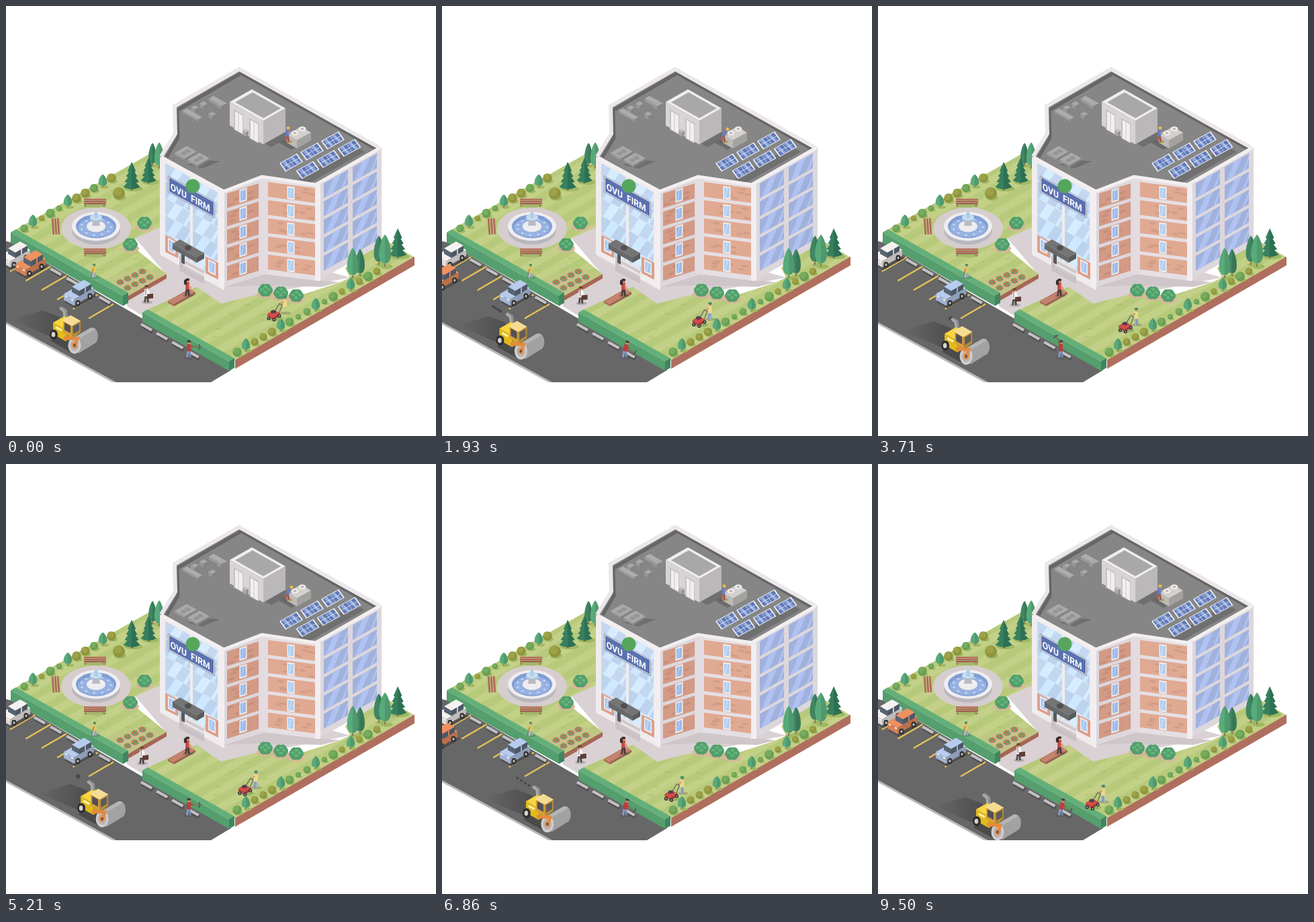
An HTML page that plays this animation: 640x640 px, repeating every 9.57 s.

```html
<!DOCTYPE html>
<html lang="en">
<head>
<meta charset="utf-8">
<title>Isometric office block</title>
<style>
  html, body { margin: 0; width: 100%; height: 100%; overflow: hidden; background: #fff; }
  svg { display: block; width: 100%; height: 100%; }
  text { font: bold 14px Roboto, "Liberation Sans", sans-serif; fill: #fff; }
</style>
</head>
<body>
<svg id="stage" viewBox="0 0 640 640"></svg>
<script>
const LOOP = 9570, STEPS = 134, ISO = .565;
const out = [];
let seed = 11;
const rnd = () => (seed = seed * 16807 % 2147483647) / 2147483647;
const times = (n, f) => { for (let i = 0; i < n; i++) f(i); };

// Basic shapes
const add = s => out.push(s);
const poly = (fill, pts) => add(`<polygon fill="${fill}" points="${pts}"/>`);
const line = (color, w, pts) => add(`<polyline fill="none" stroke="${color}" stroke-width="${w}" points="${pts}"/>`);
const oval = (fill, x, y, rx, ry = rx) => add(`<ellipse fill="${fill}" cx="${x}" cy="${y}" rx="${rx}" ry="${ry}"/>`);
const path = (fill, d) => add(`<path fill="${fill}" d="${d}"/>`);
const group = (attrs, draw) => { add(`<g ${attrs}>`); draw(); add('</g>'); };
const at = (x, y, draw, k = 1) => group(`transform="translate(${x} ${y}) scale(${k})"`, draw);
const tone = (hex, k) => `rgb(${[1, 3, 5].map(i => Math.min(255, parseInt(hex.substr(i, 2), 16) * k | 0))})`;

// Wall pieces: upright sides, top and bottom edges at slope m
const spot = (x, y, w, h, m) => (u, v) => `${x + u * w},${y + m * u * w + v * h} `;
const quad = (fill, x, y, w, h, m) => {
  const p = spot(x, y, w, h, m);
  poly(fill, p(0, 0) + p(1, 0) + p(1, 1) + p(0, 1));
};
const glass = (x, y, w, h, m, base) => {
  const p = spot(x, y, w, h, m), lite = tone(base, 1.1);
  quad(base, x, y, w, h, m);
  poly(lite, p(.08, 1) + p(.38, 1) + p(.72, 0) + p(.4, 0));
  poly(lite, p(.72, 1) + p(.84, 1) + p(1, .45) + p(1, .1));
};
const windowAt = (x, y, m, pane) => {
  quad('#f3eff1', x, y, 11, 19, m);
  glass(x + 1.5, y + 2 + m * 1.5, 8, 15, m, pane);
};

// Flat rhomb and solid box; (x, y) is the near corner, a runs left, b runs right
const slab = (fill, x, y, a, b) => {
  const p = (u, v) => `${x + v - u},${y - (u + v) * ISO} `;
  poly(fill, p(0, 0) + p(a, 0) + p(a, b) + p(0, b));
};
const box = (x, y, a, b, h, color, side = color) => {
  slab(color, x, y, a, b);
  quad(tone(side, .9), x - a, y - a * ISO, a, h, ISO);
  quad(tone(side, .78), x, y, b, h, -ISO);
};

// Plants
const shrub = (x, y, r) => {
  const color = rnd() < .5 ? '#8f9440' : '#6b9e55';
  oval('#9fb862', x + 2, y + r * .7, r, r * .5);
  oval(color, x, y, r);
  oval(tone(color, 1.1), x - r * .2, y - r * .25, r * .68);
};
const leafTree = (x, base, w, h, color = '#59aa7b') => {
  const r = w / 2, top = base - h, foot = base - h * .1;
  oval('#9fb862', x + 3, base, r, r * .4);
  line('#8a6a50', 1.6, `${x},${foot} ${x},${base}`);
  const half = s => `M${x},${top} C${x + s * r * .9},${top + h * .15} ${x + s * r * 1.8},${foot} ${x},${foot}Z`;
  path(color, half(-1));
  path(tone(color, .9), half(1));
};
const treePair = (x, base, h, gap) => {
  leafTree(x + gap, base - 3, h * .3, h * .9, '#408661');
  leafTree(x, base, h * .36, h);
};
const pine = (x, base, w, h) => {
  const top = base - h;
  oval('#9fb862', x + 3, base - 2, w * .55, 4);
  line('#80604a', 3, `${x},${base - 6} ${x},${base}`);
  for (let i = 3; i >= 0; i--) {
    const y = top + i * h * .19, r = w * (.24 + i * .088), b = y + h * .32;
    path('#37805f', `M${x},${y} L${x + r},${b} Q${x},${b + 6} ${x - r},${b}Z`);
    path('#2d7054', `M${x},${y} L${x + r},${b} Q${x + r / 2},${b + 3} ${x},${b + 3}Z`);
  }
};
const border = (x0, y0, n) => times(n, i => {
  const x = x0 + 13 * i, y = y0 - 7.5 * i;
  if (i % 4 == 1) leafTree(x, y + 6, 12, 19);
  else shrub(x, y, 4 + 3 * rnd());
});
const bush = (x, y) => {
  oval('#d9b69b', x, y + 6, 13, 6);
  times(6, i => oval('#519f6b', x + 5 * Math.cos(i * 1.05), y + 4 * Math.sin(i * 1.05), 6));
  times(4, i => oval('#66b37d', x + 5 * Math.cos(i * 1.6), y - 1 + 4 * Math.sin(i * 1.6), 2.8, 2));
};
const hedge = (x, y, w, h) => {
  box(x + w, y + w * ISO, w, 8, h, '#64af79', '#5fb07a');
  quad('#3f8560', x + w, y + w * ISO, 8, h, -ISO);
};
const tufts = (x, y, a, b) => times(7, () => {
  const u = rnd() * a, v = rnd() * b, tx = x + v - u, ty = y - (u + v) * ISO;
  times(3, i => line('#9cb763', .8, `${tx + i * 3},${ty} ${tx + i * 3 + 1},${ty + 3}`));
});

// Furniture, cars and people
const bench = (x, y) => at(x, y, () => {
  oval('#a5b86c', 1, 6, 17, 3);
  times(3, i => line(tone('#b66f60', 1 - i * .06), 2.6, `-16,${i * 3 - 3} 17,${i * 3 - 3}`));
  for (const s of [-14, 14]) line('#7d4a44', 1.2, `${s},5 ${s},8`);
});
const car = color => {
  slab('#505050', -6, 23, 16, 32);
  box(-8, 10, 15, 30, 9, color);
  box(0, -3, 11, 18, 8, color, '#62707f');
  line(color, 1.5, '9,-8 9,0');
  for (const x of [-2, 16]) {
    const y = 14 - x * ISO;
    oval('#2e2e2e', x, y, 3.6, 4.4);
    oval('#b5b5b5', x, y, 1.6, 2.1);
  }
  for (const x of [-21, -12]) line('#f7f0d8', 2.2, `${x},${16 + x * ISO} ${x + 3},${17.7 + x * ISO}`);
};
const person = (id, hat, shirt, legs, extra, k = 1) => group(`id="${id}"`, () => group(`transform="scale(${k})"`, () => {
  oval('rgba(60,60,50,.25)', 1, 0, 8, 2.3);
  group(`id="${id}Legs"`, () => {
    for (const s of [-1, 1]) add(`<path stroke="${tone(legs, 1 - s * .07)}" stroke-width="2.8" vector-effect="non-scaling-stroke" d="M${s},-10 L${s * 2.5},0"/>`);
  });
  group(`id="${id}Top"`, () => {
    line(shirt, 5.8, '0,-20 0,-9');
    oval('#d59a78', .4, -22, 2.4);
    oval(hat, .2, -23.8, 2.9, 1.9);
    extra();
  });
}));

function ground() {
  add(`<defs>
    <pattern id="lawn" width="40" height="26" patternUnits="userSpaceOnUse" patternTransform="skewY(-30)">
      <rect width="40" height="26" fill="#c3d087"/><rect width="40" height="13" fill="#b7ca7b"/></pattern>
    <linearGradient id="trail"><stop offset="0" stop-color="#3c3c3c" stop-opacity="0"/>
      <stop offset="1" stop-color="#3c3c3c" stop-opacity=".6"/></linearGradient>
    <clipPath id="frame"><rect width="640" height="560"/></clipPath></defs>`);
  poly('#676767', '0,350 8,352 335,542 305,560 160,560 0,473');
  line('#fff', 7, '-2,476 160,565');
  line('#b9b9b9', 3, '-2,471 163,561');
  poly('#d9d1d3', '180,447 180,430 238,399 192,345 225,325 512,404 372,431 318,444 214,452 203,461');
  poly('url(#lawn)', '7,337 230,211 250,320 192,346 196,364 239,399 181,432');
  poly('url(#lawn)', '206,454 284,418 320,443 372,430 440,430 498,411 512,404 505,390 557,344 608,374 341,528');
  poly('#cfc6ca', '326,418 382,399 462,408 497,411 470,418 374,416');
  quad('#b06f5e', 341, 527, 267, 13, -.577);
  quad('#a76656', 181, 432, 58, 7, -.577);
  tufts(170, 412, 110, 60);
  tufts(335, 515, 90, 90);
}

function garden() {
  treePair(228, 241, 38, -10);
  pine(212, 264, 23, 38);
  pine(187, 274, 25, 42);
  border(27, 331, 11);
  shrub(168, 279, 9);

  // Fountain
  oval('#d6cdcf', 134, 331, 52, 31);
  oval('#b9b7bd', 134, 334, 36, 21);
  oval('#efedf0', 134, 328, 36, 21.5);
  oval('#7f9dd4', 134, 328, 30, 17.5);
  oval('#97b2e1', 134, 330, 27, 14);
  times(11, i => oval('#cbdcf5', 134 + 22 * Math.cos(i * .57), 329 + 12 * Math.sin(i * .57), 2, 1.1));
  oval('#efedf0', 134, 328, 14, 8.5);
  poly('#bdbac1', '130,314 138,314 140,327 128,327');
  oval('#a9bccf', 134, 317, 9, 5);
  oval('#c7dcee', 134, 314.5, 9, 5);
  oval('#a9cde8', 134, 311, 2.7, 5);

  bench(132, 291);
  bench(132, 365);
  group('transform="translate(74 328) rotate(86) scale(.8 1)"', () =>
    times(3, i => line('#b06a5c', 2.8, `-15,${i * 4 - 4} 15,${i * 4 - 4}`)));
  bush(206, 323);
  bush(185, 355);

  // Flower bed
  poly('#bfc783', '150,406 198,389 239,399 181,431');
  times(8, n => {
    const i = n % 4, r = n >> 2, x = 170 + i * 11 + r * 11, y = 411 - i * 5.3 + r * 8.5;
    oval('#d9b49b', x, y + 2, 7, 4);
    oval('#5b9f60', x, y, 5.5, 4);
    times(4, j => oval('#e27159', x + 3.6 * Math.cos(j * 1.57), y - .5 + 2.4 * Math.sin(j * 1.57), 1.7, 1.4));
  });
}

function roof() {
  poly('#868686', '347,94 556,211 461,266 381,254 324,277 231,224 252,190 251,149');
  group('transform="translate(3 6)"', () => line('#666', 5, '236,219 253,190 252,149 347,94 552,209'));
  line('#ece7ea', 6, '231,224 252,190 251,149 347,94 556,211');

  // Loose ducts
  box(286, 169, 23, 6, 3, '#adadad');
  box(322, 149, 20, 7, 4, '#adadad');
  times(4, i => box(281 + 13 * i, 155 + 9 * Math.sin(i * 2.3 + 3.2), 6, 6, 5, '#a8a8a8'));

  // Flat fan units
  poly('#6f6f6f', '270,236 292,229 319,231 292,242');
  for (const [x, y] of [[266, 227], [285, 237]]) {
    box(x, y, 15, 18, 3, '#a9a9a9');
    for (const d of [6, 12]) oval('#959595', x + d - 7.5, y - 4 - d * ISO, 4.2, 2.6);
  }

  // Stair house
  slab('#6f6f6f', 395, 210, 20, 30);
  box(383, 171, 50, 33, 35, '#f1ecee');
  slab('#a8a8a8', 383, 167, 42, 26);
  for (const x of [341, 364]) {
    quad('#c5c0c3', x - 2, x * ISO - 39, 14, 30, ISO);
    quad('#f3eff1', x, x * ISO - 36, 11, 27, ISO);
    line('#cbc6c9', 1, `${x + 5},${x * ISO - 33} ${x + 5},${x * ISO - 6}`);
  }
  box(357, 188, 5, 4, 6, '#c0bcbe');

  // Solar array
  slab('#707070', 449, 265, 14, 85);
  times(6, n => {
    const i = n % 3, j = n >> 2 || +(n == 3), cx = 424.5 + 31 * i + 24.5 * j, cy = 233 - 16.5 * i + 11.2 * j;
    at(cx, cy, () => {
      const p = (u, v, k = 1) => `${k * (13 * u + 4.5 * v)},${k * (-7.2 * u + 6.2 * v)} `;
      const sheet = (fill, k) => poly(fill, p(-1, -1, k) + p(1, -1, k) + p(1, 1, k) + p(-1, 1, k));
      sheet('#f2f2f4', 1);
      sheet('#6079b8', .88);
      for (const u of [-.8, .1]) poly('#8ea5d8', p(u, -.88) + p(u + .35, -.88) + p(u + .65, .88) + p(u + .3, .88));
      line('#dbe3f3', .9, p(-.88, 0) + p(.88, 0));
      for (const u of [-.44, 0, .44]) line('#dbe3f3', .9, p(u, -.88) + p(u, .88));
    });
  });

  // Air conditioner
  slab('#6b6b6b', 425, 214, 20, 16);
  box(433, 200, 15, 21, 12, '#d3d0cd');
  for (const x of [430, 441]) {
    const y = 432 - x * ISO;
    oval('#f0eeec', x, y, 5.5, 3.6);
    oval('#b9b6b4', x, y, 2.6, 1.6);
  }
  oval('#e3c04c', 423.5, 203, 2);
}

function building() {
  const rows = f => times(5, i => f(27 * i, i));
  const bricks = (fill, x, y, w, m) => {
    quad(fill, x, y, w, 22, m);
    times(w / 9 | 0, () => {
      const u = rnd() * (w - 9);
      quad(tone(fill, .93), x + u, y + u * m + 2 + rnd() * 15, 9, 3, m);
    });
  };

  // Glazed entrance front
  quad('#f0ecee', 229, 224, 96, 146, .555);
  for (const x of [237, 278]) rows((d, i) => glass(x, 234 + (x - 237) * .555 + d * .96, 37, 25, .555, i % 2 ? '#bcd3ee' : '#c3d8f0'));
  for (const x of [237, 297]) {
    quad('#dd9f88', x, 341 + (x - 237) * .53, 19, 25, .5);
    windowAt(x + 4, 345 + (x - 237) * .53, .5, '#a9c4e8');
  }
  quad('#c9c1c5', 258, 372, 37, 22, .53);
  times(4, i => quad(i % 2 ? '#cfc8cb' : '#e9e4e6', 264, 374 + i * 4, 31, 4, .53));
  quad('#585858', 261, 366, 5, 16, ISO);
  box(284, 374, 36, 11, 8, '#747474');
  oval('#505050', 271, 360, 5, 4);

  // Sign
  ['#8e93a8', '#f5f6fa', '#5a71b0'].forEach((color, d) => quad(color, 241 + d, 252 + d * 1.55, 70 - 2 * d, 25 - 2 * d, .556));
  add('<text transform="matrix(.866 .49 0 1 244.8 273.3)">OVU</text>');
  add('<text transform="matrix(.866 .49 0 1 275 290.3)">FIRM</text>');
  oval('#55a65c', 278, 268, 10.5);

  // Brick wings
  poly('#ddd7dc', '324,277 381,254 383,400 325,418');
  poly('#e5dfe3', '381,254 461,266 465,409 383,399');
  rows(d => {
    bricks('#d39a85', 329, 279 + d, 47, -.32);
    bricks('#e0a992', 390, 262 + d, 70, .13);
    windowAt(347.5, 274 + d, -.32, '#9ab7e4');
    windowAt(418.5, 268 + d, .13, '#adcbee');
  });
  quad('#e2dbe0', 377, 256, 13, 143, -.1);

  // Glazed side
  poly('#ddd7dc', '461,266 559,210 559,355 465,409');
  for (const x of [473, 516]) rows(d => glass(x, 264 - (x - 473) * ISO + d, 36, 22, -ISO, '#a0b1dc'));
  quad('#f2edf0', 460, 266, 8, 143, 0);
  quad('#f2edf0', 316, 274, 9, 144, .4);
  line('#f3eff1', 5, '231,225 324,276 381,254 461,266 557,211');
}

function frontage() {
  pine(583, 375, 26, 44);
  treePair(564, 388, 48, -9);
  treePair(516, 405, 45, 11);
  times(3, i => bush(386 + 23 * i, 423 + 4 * i));
  border(344, 515, 17);

  // Slatted seat
  box(250, 444, 9, 32, 3, '#bf7a67');
  for (const d of [3, 6]) line('#d39a84', 1, `${250 - d},${444 - d * ISO} ${282 - d},${426 - d * ISO}`);

  hedge(7, 337, 167, 15);
  hedge(203, 456, 129, 14);
  times(6, i => line('#e8c257', 2.3, `${6 + 23.4 * i},${395 + 14 * i} ${43 + 23.4 * i},${373.5 + 14 * i}`));
  const stop = (x, y) => {
    line('#4f4f4f', 5, `${x - 7},${y - 2} ${x + 9},${y + 7}`);
    line('#c2c2c4', 4, `${x - 8},${y - 4.5} ${x + 8},${y + 4.5}`);
  };
  times(5, i => stop(50 + 24.2 * i, 381.5 + 14 * i));
  times(4, i => stop(209 + 23.2 * i, 478 + 13.4 * i));
}

function people() {
  const skin = '#d59a78';
  person('gardener', '#3f8f58', '#e6c84c', '#a9b3c0', () => {
    line(skin, 1.8, '-1,-16 -5,-12');
    line('#8c6a47', 1.1, '-1,-17 -6,0');
  }, .8);
  person('sitter', '#382c2e', '#c74c40', '#4a3d3d', () => {
    oval('#382c2e', -3, -20, 2.2, 4);
    line('#d9a27f', 1.8, '2,-16 6,-11 2,-12');
  });
  person('clerk', '#6b4b38', '#f7f5f3', '#504c48', () => {
    line('#6b6660', 1, '-1,-22 -1,-11');
    line('#f7f5f3', 2, '2,-20 4,-12');
    quad('#5e3a36', 1, -12, 9, 7, -.1);
  });
  person('digger', '#4a4240', '#bd3d3d', '#7f93c0', () => group('id="pick"', () => {
    line('#bd3d3d', 2.4, '0,0 7,.5');
    line('#8c6a47', 1.3, '5,.5 17,.5');
    line('#575b60', 2, '15,-4 17,0 15.5,4');
  }));
  person('fitter', '#f2c431', '#637fc0', '#a65c4c', () => line(skin, 1.7, '2,-17 6,-13'), .88);
  group('id="mower"', () => {
    oval('#93ae61', -15, 8, 12, 3.5);
    person('walker', '#3f8f6b', '#ecd98c', '#8fa3cc', () => line(skin, 1.8, '-1,-17 -6,-13'));
    line('#5a5a5a', 1.1, '-16,-1 -8,-14 -4,-12 -10,4');
    box(-17, 6, 9, 10, 4, '#d64a48');
    oval('#4b4448', -17, -2, 4, 2.5);
    for (const [x, y] of [[-24, 8], [-16, 10], [-8, 4]]) {
      oval('#3b3638', x, y, 2.6);
      oval('#bbb', x, y, 1);
    }
  });
}

// Road roller, origin at the drum centre
function roller() {
  group('id="roller"', () => {
    poly('url(#trail)', '-108,-30 -62,-44 -36,-34 -38,0');
    slab('#4a4a4a', -20, 18, 30, 24);
    times(4, i => add(`<circle id="puff${i}" fill="#484848"/>`));
    line('#8f8f8f', 6, '-27,-33 -28,-43 -35,-48');
    line('#acacac', 3, '-29,-34 -30,-43 -36,-48');
    box(-27, -15, 19, 17, 17, '#f9d53f', '#fbd01f');
    line('#fff3b0', 3, '-42,-19 -33,-14');
    box(-18, -21, 13, 13, 17, '#f5d98a', '#f0b045');
    quad('#505152', -29, -26, 9, 11, ISO);
    quad('#5b5c5d', -16, -20, 9, 11, -ISO);
    slab('#f5dc94', -18, -21, 15, 13);
    oval('#2f2f2f', -45, -8, 6, 7.5);
    oval('#d8d4cc', -45.5, -8, 2.8, 3.8);
    path('#a2a2a2', 'M-16,-3 L10,-18 C18,-20 23,-10 20,0 L18,4 L-8,20Z');
    path('#b5b5b5', 'M-16,-3 L10,-18 Q14,-19 17,-16 L-8,-1Z');
    oval('#d2cecf', -14, 8, 9.5, 12.5);
    oval('#bab6b8', -14, 8, 6.5, 9);
    line('#e58b3e', 5, '-30,-3 -10,-2 -13,8');
    oval('#e58b3e', -14, 8, 4, 4.8);
    oval('#5a5350', -14, 8, 1.8, 2.2);
  });
}

ground(); garden(); roof(); building(); frontage();
at(14, 370, () => car('#f5f2f1'));
group('id="taxi"', () => car('#ee9160'));
at(109, 427, () => car('#b7cbee'));
people(); roller();
document.getElementById('stage').innerHTML = `<g clip-path="url(#frame)">${out.join('')}</g>`;

const nodes = {};
const el = id => nodes[id] ||= document.getElementById(id);
const set = (id, transform) => el(id).setAttribute('transform', transform);
const move = (id, x, y) => set(id, `translate(${x} ${y})`);
const ramp = (t, a, b) => Math.min(1, Math.max(0, (t - a) / (b - a)));
const ease = (t, a, b) => { const u = ramp(t, a, b); return u * u * (3 - 2 * u); };

function pose(t) {
  const p = t / LOOP, cycle = n => p * n % 1, wave = n => Math.sin(p * n * 2 * Math.PI);
  move('roller', 116 + .008 * t, 497 + .0045 * t);
  move('mower', 415 - .0084 * t, 457 + .00484 * t);
  set('walkerLegs', `translate(0 -10) scale(${wave(9)} 1) translate(0 10)`);

  // The orange car speeds away, then rolls back in and brakes
  const away = t < 5000 ? ramp(t, 1000, 2300) ** 2 : (1 - ramp(t, 6000, 9200)) ** 2;
  move('taxi', 37 - 67 * away, 383 + 40 * away);

  const walk = (1 - Math.cos(2 * Math.PI * p)) / 2;
  move('clerk', 209 - 7 * walk, 441 + 5 * walk);
  move('gardener', 131 + .8 * wave(6), 404 + .4 * wave(6));
  move('sitter', 270, 431 + .5 * wave(6));

  // Lift, swing over the shoulder, strike, recover
  const c = cycle(4), swing = 5 - 123 * ease(c, .16, .45) + 156 * ease(c, .6, .7) - 33 * ease(c, .965, 1);
  const bend = Math.max(0, swing - 5) * .45;
  move('digger', 272, 523);
  set('diggerTop', `rotate(${bend} 0 -9)`);
  set('pick', `translate(0 -17) rotate(${swing - bend})`);

  const l = cycle(3), lean = -2 * ease(l, .2, .4) + 5 * ease(l, .5, .6) - 3 * ease(l, .68, .85);
  move('fitter', 418.5, 202);
  set('fitterTop', `rotate(${6 + lean * 8} 0 -9)`);

  const puff = cycle(8), go = ramp(puff, .04, .24), spread = ramp(puff, .4, .8);
  times(4, i => {
    const dot = el('puff' + i), d = (i - 1.5) * spread;
    dot.setAttribute('cx', -36 - 14 * go + 7 * d);
    dot.setAttribute('cy', -48 - 7 * go + 4.5 * d);
    dot.setAttribute('r', puff > .04 && puff < .9 ? 3.4 - 2 * puff : 0);
  });
}
function tick() {
  const t = performance.now() % LOOP;
  pose(Math.floor(t / LOOP * STEPS) * LOOP / STEPS);
  requestAnimationFrame(tick);
}
tick();
</script>
</body>
</html>
```
